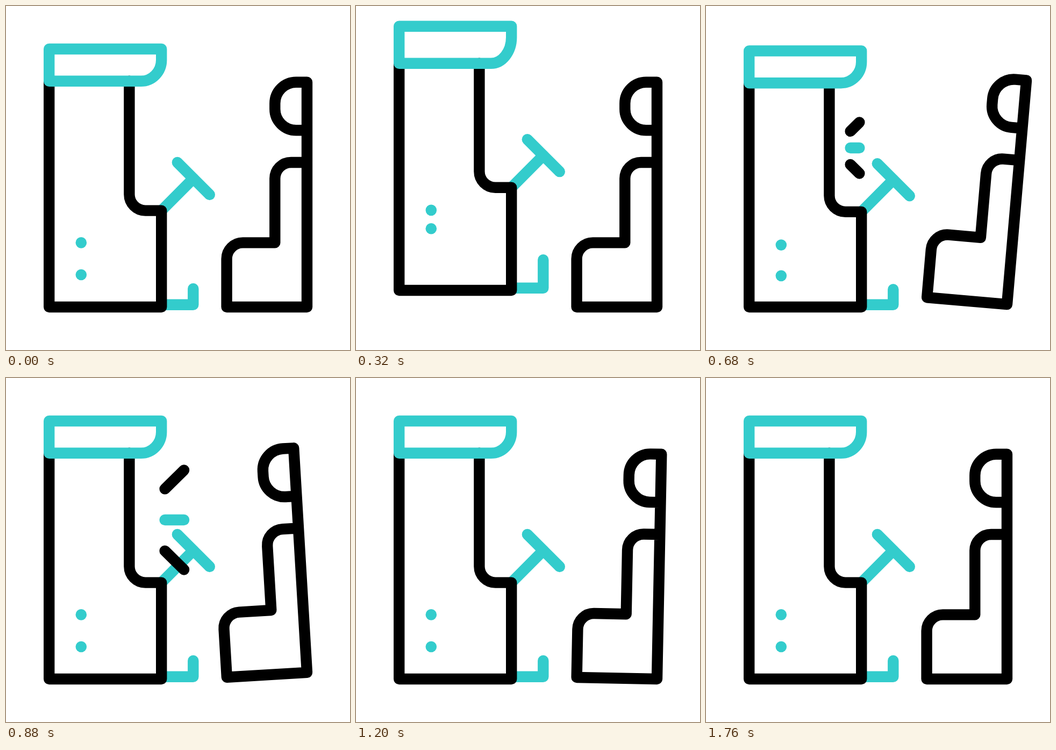
Recreate the animation shown at these times as an HTML page with a canvas. Size 640 by 640 pixels, loop 2 s.

```html
<!DOCTYPE html>
<html lang="en">
<head>
<meta charset="utf-8">
<title>Arcade machine</title>
<style>
  html, body { margin: 0; width: 100%; height: 100%; overflow: hidden; background: #fff; }
  canvas { display: block; width: 640px; height: 640px; }
</style>
</head>
<body>
<canvas id="stage" width="640" height="640"></canvas>
<script>
const ctx = document.getElementById('stage').getContext('2d');
const LOOP = 2000, STEP = 40;
const TEAL = '#33cccc', BLACK = '#000';

const smooth = u => u * u * (3 - 2 * u);

// Eased value at time t from [time, value] keys.
function track(t, keys) {
  if (t <= keys[0][0]) return keys[0][1];
  for (let i = 1; i < keys.length; i++) {
    const [t0, v0] = keys[i - 1], [t1, v1] = keys[i];
    if (t < t1) return v0 + (v1 - v0) * smooth((t - t0) / (t1 - t0));
  }
  return keys[keys.length - 1][1];
}

// Vertical shift of a cabinet part: leap, squash on landing, recover.
const leap = (t, up, squash) => track(t, [[80, 0], [280, up], [520, squash], [720, 0]]);

function stroke(color, build) {
  ctx.strokeStyle = color;
  ctx.beginPath();
  build(ctx);
  ctx.stroke();
}

function line(color, ...points) {
  stroke(color, c => points.forEach(([x, y]) => c.lineTo(x, y)));
}

function dot(x, y) {
  ctx.fillStyle = TEAL;
  ctx.beginPath();
  ctx.arc(x, y, 10.3, 0, Math.PI * 2);
  ctx.fill();
}

function drawCabinet(t) {
  const left = 80.2, right = 289.2, neck = 229.4;
  const hoodTop = 80 + leap(t, -48.3, 33.5);
  const hoodBase = 139.8 + leap(t, -38.3, 33.3);
  const lift = leap(t, -48, 21.7);
  const shelf = 380.6 + lift;
  const floorShift = leap(t, -33.5, 0);
  const floor = 560 + floorShift;
  const pedal = 555.7 + floorShift;

  line(TEAL, [right, shelf], [348.5, 321 + lift]);
  line(TEAL, [318.8, 291 + lift], [378.8, 351 + lift]);
  line(TEAL, [right, pedal], [348.3, pedal], [348.3, 526 + leap(t, -59, 11.2)]);

  stroke(BLACK, c => {
    c.moveTo(left, hoodBase);
    c.lineTo(left, floor);
    c.lineTo(right, floor);
    c.lineTo(right, shelf);
    c.lineTo(259.4, shelf);
    c.arc(259.4, shelf - 30, 30, Math.PI / 2, Math.PI);
    c.lineTo(neck, hoodBase);
  });

  const bendX = 251, bendY = hoodTop + 20.5;
  stroke(TEAL, c => {
    c.moveTo(left, hoodTop);
    c.lineTo(right, hoodTop);
    c.lineTo(right, bendY);
    c.ellipse(bendX, bendY, right - bendX, hoodBase - bendY, 0, 0, Math.PI / 2);
    c.lineTo(left, hoodBase);
    c.closePath();
  });

  dot(139.8, 440.4 + leap(t, -68.6, 40.4));
  dot(139.8, 500 + leap(t, -94, 17.8));
}

function drawChair(t) {
  const angle = track(t, [[520, 0], [640, 7.2], [800, -7.2], [1000, 3.6], [1320, 0]]);
  const lift = track(t, [[620, 0], [800, 18.7], [1000, 0]]);
  const x = 560, y = 560, edge = 500.3;
  ctx.save();
  ctx.translate(x, y - lift);
  ctx.rotate(angle * Math.PI / 180);
  ctx.translate(-x, -y);
  stroke(BLACK, c => {
    c.moveTo(x, 141.7);
    c.arcTo(edge, 141.7, edge, 186, 39.5);
    c.arcTo(edge, 231.3, x, 231.3, 39.5);
    c.lineTo(x, 231.3);
    c.moveTo(x, 291);
    c.arcTo(edge, 291, edge, 440.4, 30);
    c.lineTo(edge, 440.4);
    c.arcTo(410.6, 440.4, 410.6, y, 30);
    c.lineTo(410.6, y);
    c.lineTo(x, y);
    c.lineTo(x, 141.7);
    c.closePath();
  });
  ctx.restore();
}

function drawRays(t, start) {
  const reach = 64.7, x = 268.6;
  const head = track(t, [[start, 0], [start + 360, reach]]);
  const tail = track(t, [[start + 160, 0], [start + 520, reach]]);
  if (head <= tail) return;
  const ray = (color, y, slope) =>
    line(color, [x + tail, y + slope * tail], [x + head, y + slope * head]);
  ray(BLACK, 233, -0.985);
  ray(TEAL, 264, 0);
  ray(BLACK, 295, 0.985);
}

function draw(t) {
  ctx.fillStyle = '#fff';
  ctx.fillRect(0, 0, 640, 640);
  ctx.lineWidth = 20.4;
  ctx.lineCap = ctx.lineJoin = 'round';
  drawCabinet(t);
  drawChair(t);
  drawRays(t, 560);
  drawRays(t, 1240);
}

const origin = performance.now();
function tick() {
  const t = (performance.now() - origin) % LOOP;
  draw(Math.floor(t / STEP) * STEP);
  requestAnimationFrame(tick);
}
tick();
</script>
</body>
</html>
```
